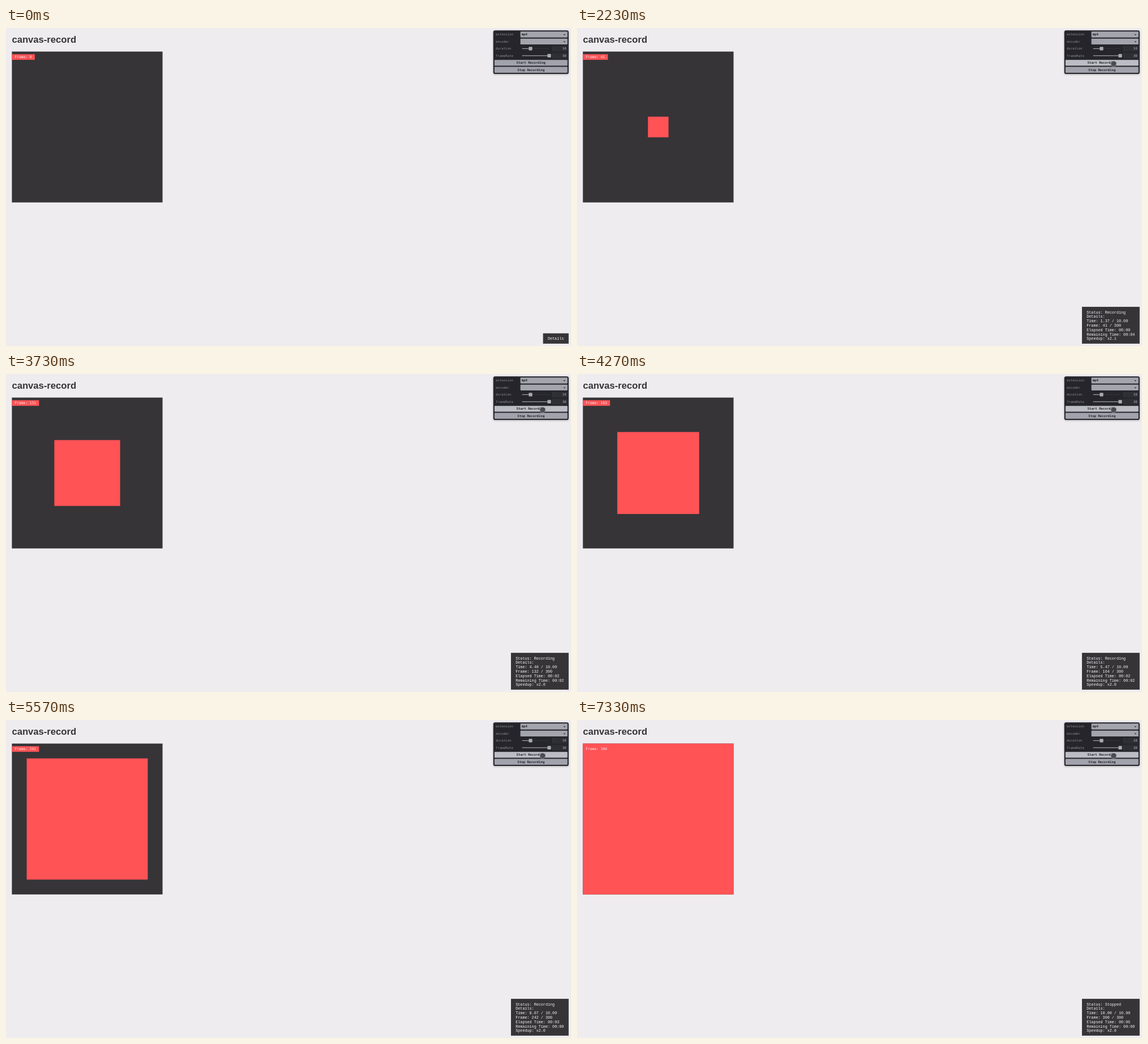
Animation, 998 px wide and 561 px high, one loop 8 s. Source, as an HTML page:

```html
<!DOCTYPE html>
<html lang="en">
<head>
<meta charset="utf-8">
<title>canvas-record</title>
<style>
  html, body { margin: 0; width: 100%; height: 100%; overflow: hidden; background: #eeecef; }
  svg { display: block; width: 998px; height: 561px; }
  text { white-space: pre; }
  .title { font: bold 32px "Liberation Sans", Arial, sans-serif; fill: #363437; }
  .label { font: 12px "DejaVu Sans Mono", monospace; fill: #f6eef0; }
  .pane { font: 11px "DejaVu Sans Mono", monospace; fill: #8b8b92; }
  .pane .value { fill: #b9bac2; text-anchor: end; }
  .pane .bold { font-weight: bold; fill: #28292e; }
  .pane .mid { text-anchor: middle; }
  .details { font: 13px "Liberation Mono", "Courier New", monospace; fill: #f4f2f5; }
  .shadow { filter: drop-shadow(0 2px 3px rgba(0, 0, 0, .3)); }
</style>
</head>
<body>
<svg viewBox="0 0 1920 1079.28" preserveAspectRatio="none">
  <text class="title" x="20" y="51">canvas-record</text>
  <rect x="20" y="80" width="512" height="512" fill="#363437"/>
  <rect id="square" fill="#ff5356"/>
  <rect id="tag" x="20" y="89" height="19" fill="#ff5356"/>
  <text id="label" class="label" x="30" y="102.5"></text>
  <g id="pane" class="pane">
    <rect class="shadow" x="1656" y="8" width="256" height="148" rx="6" fill="#25252b"/>
  </g>
  <circle id="cursor" r="9.5" fill="#45464b" fill-opacity=".93" stroke="#a5a5aa" stroke-width="1.5"/>
  <rect id="box" fill="#363437"/>
  <g id="details" class="details"></g>
</svg>
<script>
const LOOP = 8000, STEP = 1000 / 30, TOTAL = 300;
const CLICK = 47; // step at which the button is pressed
const $ = id => document.getElementById(id);

function add(parent, tag, attrs, text = '') {
  const el = document.createElementNS('http://www.w3.org/2000/svg', tag);
  set(el, attrs);
  el.textContent = text;
  return parent.appendChild(el);
}
function set(el, attrs) {
  for (const key in attrs) el.setAttribute(key, attrs[key]);
}

const pane = $('pane');
const rect = (x, y, width, height, fill, rx = 0) =>
  add(pane, 'rect', { x, y, width, height, fill, rx });
const rowY = i => 12 + 24 * i;
const write = (x, i, text, cls = '') => add(pane, 'text', { x, y: rowY(i) + 14, class: cls }, text);

['extension', 'encoder', 'duration', 'frameRate'].forEach((name, i) => write(1664, i, name));

function select(i, value) {
  const y = rowY(i);
  rect(1748, y, 160, 20, '#a3a4ac', 2);
  write(1752, i, value, 'bold');
  add(pane, 'path', { d: `M1894 ${y + 9}h7l-3.5 4z`, fill: '#28292e' });
}
function slider(i, value, part) {
  const y = rowY(i), w = 92 * part;
  rect(1754, y + 9, 92, 2, '#36363d');
  rect(1754, y + 9, w, 2, '#b0b1b9');
  rect(1748 + w, y + 4, 12, 12, '#a9aab2', 2);
  rect(1856, y, 52, 20, '#2e2e35', 2);
  rect(1858, y + 3, 2, 14, '#3b3b43', 1);
  write(1904, i, value, 'value');
}
function button(i, text) {
  const bg = rect(1660, rowY(i), 248, 20, '#a2a2ac', 2);
  write(1784, i, text, 'bold mid');
  return bg;
}
select(0, 'mp4');
select(1, '');
slider(2, 10, .309);
slider(3, 30, 1);
const start = button(4, 'Start Recording');
button(5, 'Stop Recording');

const lines = Array.from({ length: 7 }, (_, i) =>
  add($('details'), 'text', { y: 969 + 15 * i }));

const clock = s => '00:' + String(Math.floor(s)).padStart(2, '0');

function report(step) {
  const count = 2 * (step - CLICK);
  const frame = Math.min(TOTAL, count + (step < 90 ? 1 : 2));
  const time = frame / 30;
  const elapsed = Math.min(step * STEP / 1000, 6.6) - 1.583;
  const speed = 2 + .066 / Math.max(elapsed, .02);
  return [
    'Status: ' + (count + 1 > TOTAL ? 'Stopped' : 'Recording'),
    'Details:',
    `Time: ${time.toFixed(2)} / 10.00`,
    `Frame: ${frame} / ${TOTAL}`,
    'Elapsed Time: ' + clock(Math.max(0, elapsed)),
    'Remaining Time: ' + clock((10 - time) / speed),
    'Speedup: x' + speed.toFixed(1)
  ];
}

function draw(ms) {
  const step = Math.floor((ms + 5) / STEP);
  const open = step > CLICK;
  const frame = open ? Math.min(TOTAL, 1 + 2 * (step - CLICK)) : 0;

  const size = 512 * frame / TOTAL;
  set($('square'), { x: 276 - size / 2, y: 336 - size / 2, width: size, height: size });
  const text = 'Frame: ' + frame;
  $('label').textContent = text;
  set($('tag'), { width: 20 + 7.224 * text.length });

  set(start, { fill: open ? '#bdbec5' : step === CLICK ? '#8fbddb' : '#a2a2ac' });

  const p = Math.min(1, Math.max(0, (step - 28) / 5));
  const ease = p * (2 - p);
  set($('cursor'), {
    cx: 1880 - 56.5 * ease, cy: 123 - 1.5 * ease,
    visibility: step < 24 ? 'hidden' : 'visible'
  });

  const w = open ? 196 : 87, h = open ? 125 : 35;
  set($('box'), { x: 1912 - w, y: 1071.3 - h, width: w, height: h });
  const rows = open ? report(step) : ['', '', '', '', '', '', 'Details'];
  lines.forEach((line, i) => {
    set(line, { x: 1928 - w });
    line.textContent = rows[i];
  });
}

let origin;
function tick(now) {
  origin ??= now;
  draw((now - origin) % LOOP);
  requestAnimationFrame(tick);
}
draw(0);
requestAnimationFrame(tick);
</script>
</body>
</html>
```
